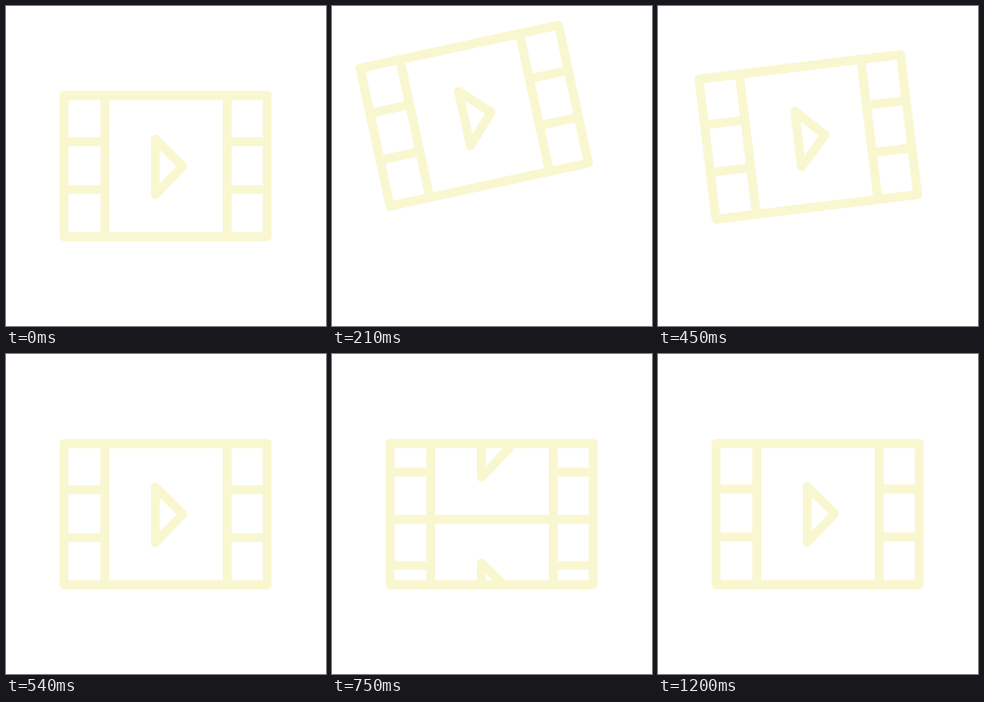
Recreate the animation shown at these times as an HTML page. Size 400x400 px, loop 3260 ms.

```html
<!DOCTYPE html>
<html lang="en">
<head>
<meta charset="utf-8">
<title>Film strip</title>
<style>
  html, body { margin: 0; width: 100%; height: 100%; overflow: hidden; background: #fff; }
  svg { display: block; width: 100%; height: 100%; }
  .ink { fill: none; stroke: #f9f7d0; stroke-width: 11.2; stroke-linejoin: round; }
</style>
</head>
<body>
<svg viewBox="0 0 400 400">
  <defs>
    <clipPath id="gate"><rect x="72" y="112" width="255" height="176.5"/></clipPath>
    <g id="cell">
      <path d="M72.5 111.9H326.5M72.5 169.6H123.5M276.5 169.6H326.5M72.5 229.5H123.5M276.5 229.5H326.5"/>
      <path d="M186.7 166.4L220.8 200.3L186.7 236Z"/>
    </g>
  </defs>
  <g id="film" class="ink">
    <g clip-path="url(#gate)">
      <g id="strip">
        <use href="#cell"/>
        <use href="#cell" y="-176.8"/>
      </g>
    </g>
    <rect x="72.6" y="111.8" width="253.8" height="176.5"/>
    <path d="M123.5 112V288M276.5 112V288"/>
  </g>
</svg>
<script>
  const LOOP = 3260, STEP = 30, LAST = 40;
  const PITCH = 176.8;
  const HOP = { steps: 17.9, angle: 12.85, rise: 40 };
  const ROLL = { start: 18, steps: 21.5, travel: 3 * PITCH - 0.8 };
  const film = document.getElementById('film');
  const strip = document.getElementById('strip');

  // Cubic Bezier ease-out with control points (x1, 1) and (x2, 1).
  function easeOut(x, x1, x2) {
    let lo = 0, hi = 1;
    for (let i = 0; i < 30; i++) {
      const s = (lo + hi) / 2, u = 1 - s;
      const at = 3 * u * u * s * x1 + 3 * u * s * s * x2 + s * s * s;
      if (at < x) lo = s; else hi = s;
    }
    return 1 - Math.pow(1 - lo, 3);
  }

  const clamp = v => Math.min(1, Math.max(0, v));

  function draw(ms) {
    const k = Math.min(LAST, Math.floor(ms / STEP));

    // Hop: a parabola that tilts about the lower left corner.
    const p = clamp(k / HOP.steps);
    const h = 4 * p * (1 - p);
    film.setAttribute('transform',
      `translate(0 ${-HOP.rise * h}) rotate(${-HOP.angle * h} 72.5 288.5)`);

    // Roll: the strip runs three cells down and settles.
    const q = clamp((k - ROLL.start) / ROLL.steps);
    const shift = q > 0 ? ROLL.travel * easeOut(q, 0.3466, 0.2498) : 0;
    strip.setAttribute('transform', `translate(0 ${shift % PITCH})`);
  }

  const begin = performance.now();
  function tick() {
    draw((performance.now() - begin) % LOOP);
    requestAnimationFrame(tick);
  }
  draw(0);
  requestAnimationFrame(tick);
</script>
</body>
</html>
```
